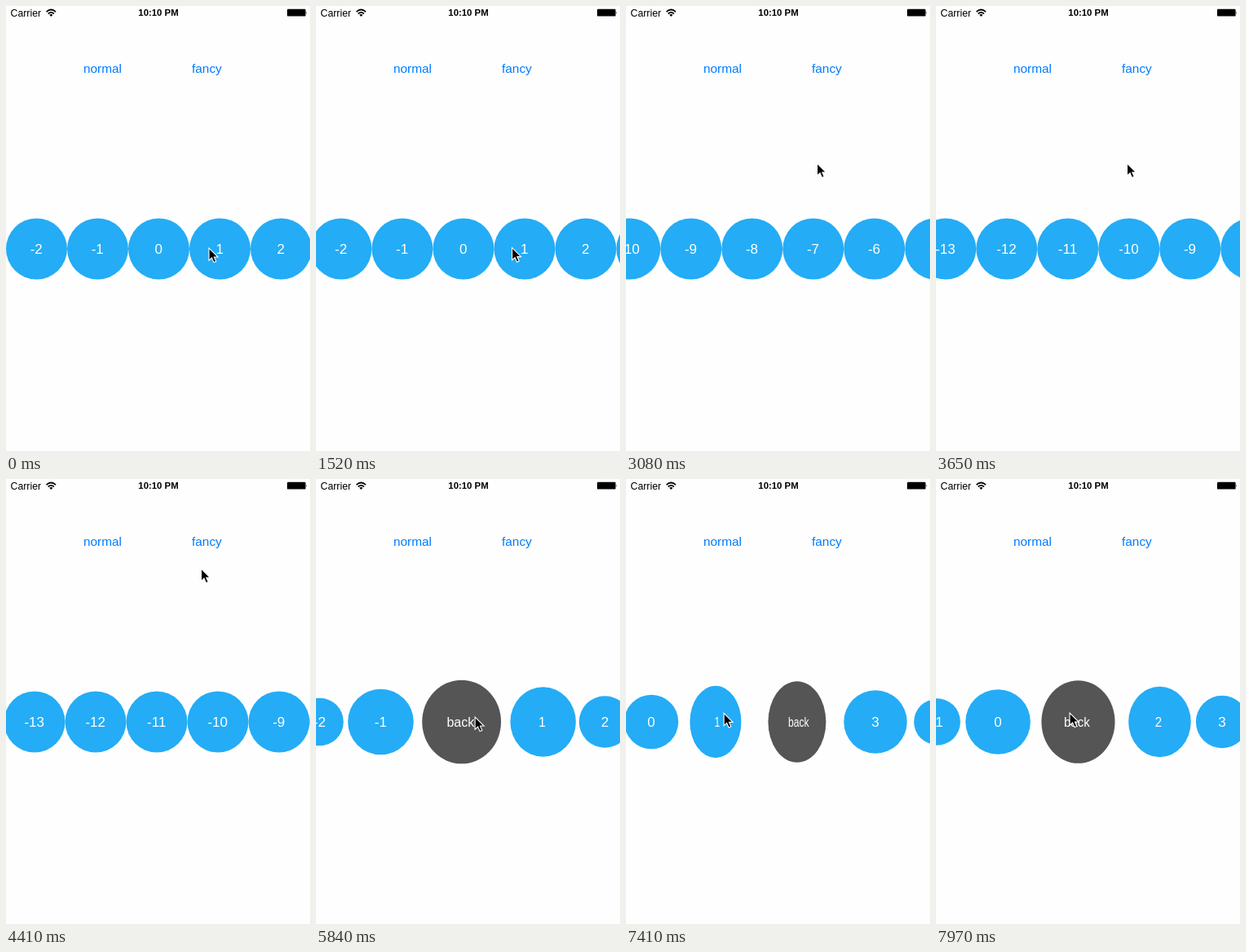
An HTML page that plays this animation: 373x546 px, repeating every 8000 ms.

```html
<!DOCTYPE html>
<html lang="en">
<head>
<meta charset="utf-8">
<title>Carousel</title>
<style>
html, body { margin: 0; width: 100%; height: 100%; overflow: hidden; background: #fefefe; }
svg { display: block; width: 373px; height: 546px; font-family: "Liberation Sans", Arial, sans-serif; }
.button { font-size: 15.4px; fill: #007aff; }
.item text { font-size: 17px; fill: #fff; text-anchor: middle; }
</style>
</head>
<body>
<svg viewBox="0 0 373 546">
  <rect width="373" height="546" fill="#fefefe"/>
  <text x="5.5" y="12.5" font-size="12.3">Carrier</text>
  <g fill="none" stroke="#000" stroke-width="1.7">
    <path d="M49.6 7.2Q55.3 1.8 61 7.2"/>
    <path d="M51.7 9.5Q55.3 6.2 58.9 9.5"/>
  </g>
  <path d="M53.2 10.7Q55.3 9.1 57.4 10.7L55.3 12.9Z"/>
  <text x="187" y="12" font-size="11.4" font-weight="bold" text-anchor="middle">10:10 PM</text>
  <rect x="345" y="3.8" width="22.6" height="8.8" rx="1.2"/>
  <path d="M368.2 6.7Q369.6 8.2 368.2 9.7Z"/>
  <text class="button" x="95" y="81.5">normal</text>
  <text class="button" x="228" y="81.5">fancy</text>
  <g id="items"></g>
  <path id="cursor" d="M0 0V15.2L3.5 12L6 17.6L8.7 16.4L6.3 11H11Z" fill="#000" stroke="#fff" stroke-width="1.1"/>
</svg>
<script>
const LOOP = 8000, FANCY_AT = 5030;
const CX = 187.5, CY = 298, STEP = 75;
const BLUE = '#24acf6', GRAY = '#555';

const linear = k => k;
const smooth = k => k * k * (3 - 2 * k);
const easeIn = k => k * k;
const easeOut = k => k * (2 - k);

// Keys are [time, value, ease into this key].
function track(keys, t) {
  if (t <= keys[0][0]) return keys[0][1];
  for (let i = 1; i < keys.length; i++) {
    const [t1, v1, ease = smooth] = keys[i];
    if (t <= t1) {
      const [t0, v0] = keys[i - 1];
      return v0 + (v1 - v0) * ease((t - t0) / (t1 - t0));
    }
  }
  return keys[keys.length - 1][1];
}

const scroll = [
  [1390, 0], [2270, 110], [2480, -44, easeIn], [3880, -820, easeOut],
  [4180, -820], [4640, -825]
];
const position = [
  [5780, 0], [5840, .105, linear], [6500, 1.8, linear], [6710, 1.942, linear],
  [6850, 2, easeOut], [7180, 2], [7970, 1.154, linear], [8000, 1.12, linear]
];
const cursorX = [
  [1390, 249], [2270, 108], [2480, 250, easeIn], [3020, 234.5],
  [4180, 234.5], [4410, 239.5], [4880, 246], [5030, 246], [5700, 204],
  [5780, 204], [5840, 195.3, linear], [6500, 72, linear], [6710, 64, linear],
  [7180, 102], [7970, 164, linear], [8000, 166, linear]
];
const cursorY = [
  [1390, 297], [2270, 290], [3020, 193], [4180, 193], [4410, 110, linear],
  [4880, 71], [5030, 71], [5700, 292], [5840, 292], [6710, 288], [7970, 287]
];

const NS = 'http://www.w3.org/2000/svg';
const add = (tag, parent) => parent.appendChild(document.createElementNS(NS, tag));
const cursor = document.getElementById('cursor');
const items = Array.from({ length: 7 }, () => {
  const group = add('g', document.getElementById('items'));
  group.setAttribute('class', 'item');
  const disc = add('ellipse', group);
  const label = add('text', group);
  disc.setAttribute('cy', CY);
  return { disc, label };
});

function place(item, x, width, height, color, text, shift, squeeze) {
  item.disc.setAttribute('cx', x);
  item.disc.setAttribute('rx', width / 2);
  item.disc.setAttribute('ry', height / 2);
  item.disc.setAttribute('fill', color);
  item.label.textContent = text;
  item.label.setAttribute('transform', `translate(${x + shift} ${CY + 6}) scale(${squeeze} 1)`);
}

function drawNormal(item, index, u) {
  place(item, CX + STEP * u, 75, 75, BLUE, index, -.3, 1);
}

// Cards shrink away from the centre and turn over as they reach it.
function drawFancy(item, index, u) {
  const d = Math.abs(u), near = Math.min(d, 1);
  const x = CX + STEP * u + 25 * Math.sign(u) * smooth(near);
  const size = 105 - 22 * d;
  const turn = Math.abs(Math.cos(Math.PI * near));
  const shift = d < 1 ? 2 * Math.sin(2 * Math.PI * u) : 0;
  const back = d < .5;
  place(item, x, size * turn, size, back ? GRAY : BLUE, back ? 'back' : index, shift, turn);
}

function render(t) {
  const fancy = t >= FANCY_AT;
  const p = fancy ? track(position, t) : track(scroll, t) / STEP;
  const first = Math.round(p) - 3;
  items.forEach((item, i) => (fancy ? drawFancy : drawNormal)(item, first + i, first + i - p));
  cursor.setAttribute('transform', `translate(${track(cursorX, t)} ${track(cursorY, t)})`);
}

const start = performance.now();
function frame() {
  render((performance.now() - start) % LOOP);
  requestAnimationFrame(frame);
}
frame();
</script>
</body>
</html>
```
